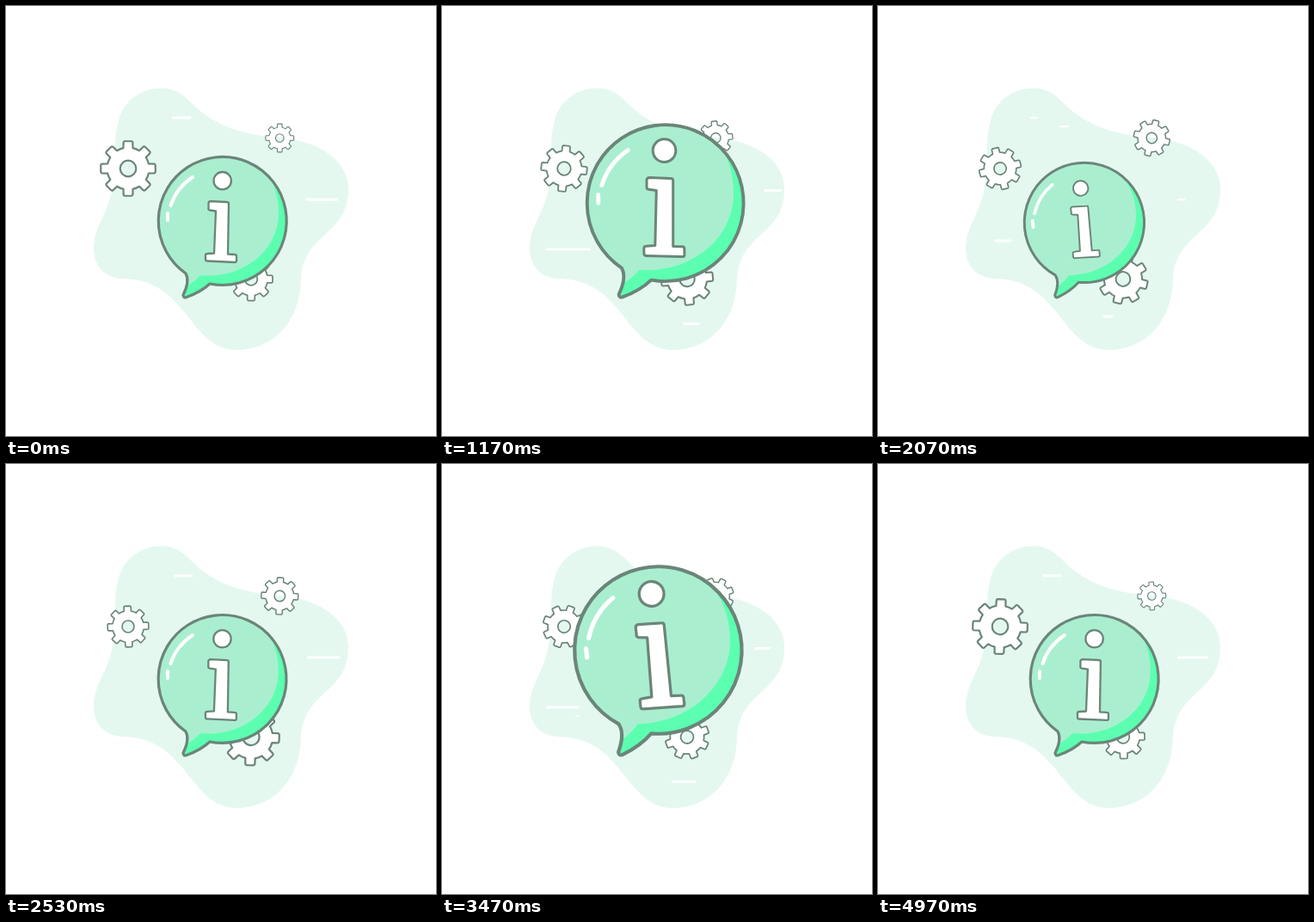
Recreate the animation shown at these times as an HTML page. Size 500 by 500 pixels, loop 5 s.

```html
<!DOCTYPE html>
<html lang="en">
<head>
<meta charset="utf-8">
<title>Info bubble</title>
<style>
  html, body { margin: 0; width: 100%; height: 100%; overflow: hidden; background: #fff; }
  svg { display: block; width: 100vw; height: 100vh; }
  .ink { stroke: #6b8579; stroke-linejoin: round; stroke-linecap: round; }
  .white { fill: #fff; }
  .streak { fill: none; stroke: #fff; stroke-linecap: round; }
</style>
</head>
<body>
<svg viewBox="0 0 500 500">
  <defs>
    <path id="balloon" d="M237 323A74.5 74.5 0 1 0 209 311Q214 320 206 336Q206 340 210 338.5Q226 333 237 323Z"/>
  </defs>
  <path fill="#e4f8f0" d="M180 95.5C200 95.5 209 106 221 118C245 139 275 150 318 153C365 157 398 180 398 213C398 268 346 262 343 318C342 368 310 400 268 400C240 400 225 378 205 353C180 323 160 318 135 317C115 316 102 303 102 282C102 250 125 240 126 190C127 160 127 147 130 137C135 108 160 95.5 180 95.5Z"/>
  <g id="streaks"></g>
  <g id="gears"></g>
  <g id="bubble">
    <use href="#balloon" fill="#aaeed0"/>
    <path fill="#5cffb0" d="M308 201.5A74.5 74.5 0 0 1 237 323Q226 333 210 338.5Q206 340 206 336Q209 330 210.5 325.5Q220 320 226 313C272 318 317 287 317 240Q317 219 308 201.5Z"/>
    <use href="#balloon" class="ink" fill="none" stroke-width="3.2"/>
    <path class="streak" stroke-width="4" d="M191.5 232A63.5 63.5 0 0 1 217 199M188 249V241"/>
    <g id="letter" class="ink white" stroke-width="2.3">
      <circle cx="251.7" cy="203.2" r="10.2"/>
      <path d="M238 227L257 228Q259 228 259 230L258 288.5L266 289Q268 289 268 291V296Q268 298 266 298L234 296.5Q232 296.5 232 294.5V290Q232 288 234 288L242 287.5L244 238.5L237 237.5Q235 237 235.5 235V229Q236 227 238 227Z"/>
    </g>
  </g>
</svg>
<script>
const NS = 'http://www.w3.org/2000/svg';
const LOOP = 5000, HALF = LOOP / 2;
const byId = id => document.getElementById(id);
const wave = s => (1 - Math.cos(Math.PI * s)) / 2;

function add(parent, tag, attrs) {
  const el = document.createElementNS(NS, tag);
  for (const key in attrs) el.setAttribute(key, attrs[key]);
  return parent.appendChild(el);
}

// Rest, dip, pop, recoil and back to rest, eased in and out at each turn.
function bounce(rest, ...turns) {
  const keys = [[0, rest], ...turns, [HALF, rest]];
  return time => {
    const t = time % HALF;
    const i = keys.findIndex(key => key[0] > t);
    const [t0, v0] = keys[i - 1], [t1, v1] = keys[i];
    return v0 + (v1 - v0) * wave((t - t0) / (t1 - t0));
  };
}

const bubbleScale = bounce(1, [620, .87], [965, 1.305], [1670, .877]);
const letterScale = bounce(1, [690, .71], [990, 1.42], [1670, .73]);
const bubbleTurn = bounce(0, [690, -17.2], [1160, -1], [1670, -11.3]);

function gearPath(teeth) {
  const step = 360 / teeth;
  const at = (r, deg) => {
    const a = deg * Math.PI / 180;
    return (r * Math.sin(a)).toFixed(2) + ' ' + (-r * Math.cos(a)).toFixed(2);
  };
  let d = '';
  for (let a = 0; a < 360; a += step) {
    d += (a ? 'L' : 'M') + at(24.5, a - 13) + 'L' + at(31, a - 10)
      + 'Q' + at(32, a - 9) + ' ' + at(32, a - 7) + 'L' + at(32, a + 7)
      + 'Q' + at(32, a + 9) + ' ' + at(31, a + 10) + 'L' + at(24.5, a + 13)
      + 'A24.5 24.5 0 0 1 ' + at(24.5, a + step - 13);
  }
  return d + 'ZM9.3 0A9.3 9.3 0 1 0 -9.3 0A9.3 9.3 0 1 0 9.3 0Z';
}

// The upper gears trade size: a decelerating change, then an eased return.
const TURN = 3000;
const drift = t => t < TURN
  ? 1 - (1 - t / TURN) ** 2
  : 1 - wave((t - TURN) / (LOOP - TURN));

const gears = [
  { x: 142, y: 189, spin: -1, radius: t => 33 - 8.5 * drift(t) },
  { x: 318.3, y: 153.5, spin: 1, radius: t => 17 + 5.4 * drift(t) },
  { x: 285, y: 317.5, spin: 1, radius: t => 26 + 8 * wave(6 * t / LOOP) }
];
const outline = gearPath(8);
for (const gear of gears) {
  gear.el = add(byId('gears'), 'path', {
    d: outline, class: 'ink white', 'fill-rule': 'evenodd', 'stroke-width': 2.2
  });
}

// Each dash slides right through a short window that starts at x.
const SPEED = .067;
function streak(x, y, length, start) {
  const end = x + 30 + .45 * length;
  const el = add(byId('streaks'), 'path', { class: 'streak' });
  return t => {
    const head = x + (t - start + LOOP) % HALF * SPEED;
    const from = Math.max(x, head - length) + 1.2;
    const to = Math.min(end, head) - 1.2;
    el.setAttribute('d', to > from ? `M${from} ${y}H${to}` : '');
    el.setAttribute('stroke-width', Math.min(2.8, Math.max(1, (to - from) / 3)));
  };
}

const streaks = [
  streak(177, 130, 22, 1930),
  streak(182, 140, 22, 1300),
  streak(190, 152, 37, 150),
  streak(366, 205, 12, 1400),
  streak(363, 214.5, 21, 690),
  streak(348, 225, 38, 1930),
  streak(123, 273, 20, 1590),
  streak(121, 283, 54, 400),
  streak(126, 293, 10, 400),
  streak(241, 361, 12, 1590),
  streak(257, 369.5, 28, 400)
];

function draw(t) {
  for (const slide of streaks) slide(t);
  for (const g of gears) {
    g.el.setAttribute('transform',
      `translate(${g.x} ${g.y}) rotate(${g.spin * 360 * t / LOOP}) scale(${g.radius(t) / 33})`);
  }
  const scale = bubbleScale(t);
  byId('bubble').setAttribute('transform',
    `translate(207 340) rotate(${bubbleTurn(t)}) scale(${scale}) translate(-207 -340)`);
  byId('letter').setAttribute('transform',
    `translate(252 249) scale(${letterScale(t) / scale}) translate(-252 -249)`);
}

const began = performance.now();
function tick() {
  draw((performance.now() - began) % LOOP);
  requestAnimationFrame(tick);
}
draw(0);
requestAnimationFrame(tick);
</script>
</body>
</html>
```
